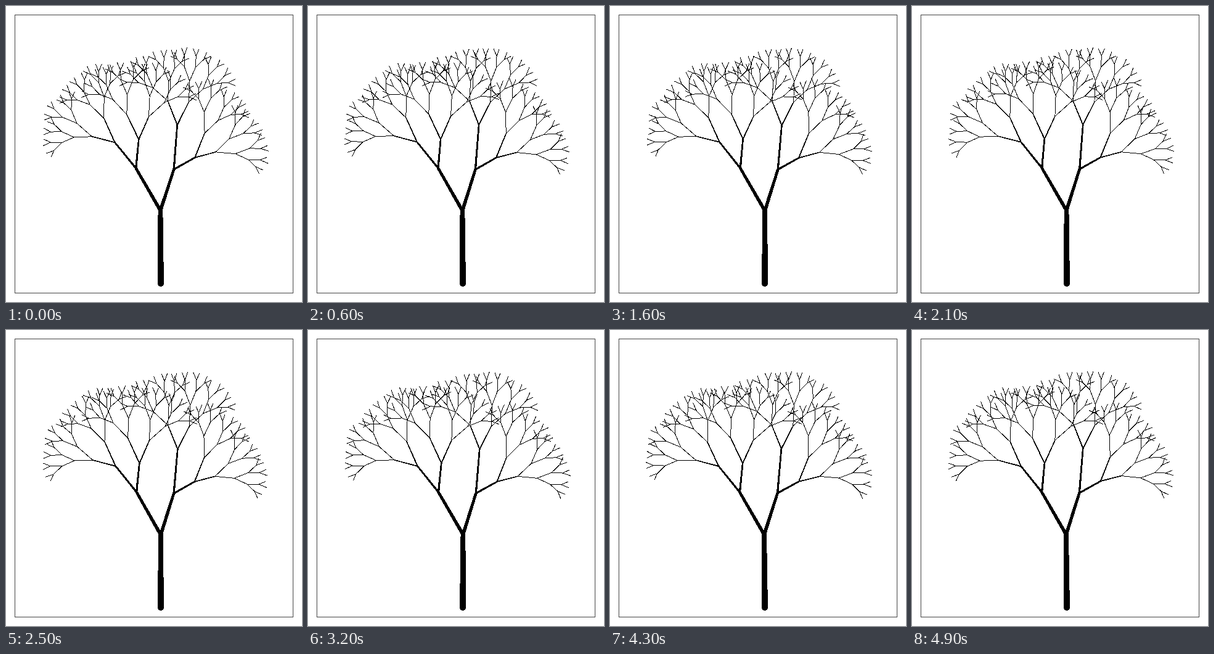
Animation, 480 px wide and 480 px high, one loop 5000 ms. Source, as an HTML page:

```html
<!DOCTYPE html>
<html lang="en">
<head>
<meta charset="utf-8">
<title>Trembling tree</title>
<style>
  html, body { margin: 0; width: 100%; height: 100%; overflow: hidden; background: #fff; }
  svg { display: block; width: 100vw; height: 100vh; }
</style>
</head>
<body>
<svg viewBox="0 0 480 480" shape-rendering="crispEdges">
  <rect width="480" height="480" fill="#fff"/>
  <rect x="14.5" y="14.5" width="451" height="451" fill="none" stroke="#444"/>
  <path id="wood"/>
  <path id="twigs" fill="none" stroke="#000"/>
</svg>
<script>
const STEP = 100, STEPS = 50, DEPTH = 7, THICK_LEVELS = 4;
const BASE = { x: 251, y: 450 };

// Ends of the trunk and the six main limbs; branch i forks into 2i and 2i + 1.
const limbs = [
  [250.7, 332],
  [211, 263], [272, 265],
  [177, 221], [215.5, 216], [278, 193], [306, 246]
];

// Repeatable noise from -1 to 1.
function noise(a, b) {
  const s = Math.sin(a * 127.1 + b * 311.7) * 43758.5453;
  return (s - Math.floor(s)) * 2 - 1;
}

// The heading depends on right turns minus left turns; side branches are shorter.
function grow(i, level, turn) {
  const spread = 22 + 80 / level ** 3;
  const angle = (turn * spread + noise(i, 3) * 3) * Math.PI / 180;
  const shrink = 1 - Math.abs(turn) * 5.7 / level ** 4;
  const length = 118 * 0.73 ** level * shrink * (1 + noise(i, 7) * 0.08);
  return [Math.sin(angle) * length, -Math.cos(angle) * length];
}

const branches = [{ ...BASE, turn: 0 }];
for (let i = 1; i < 2 ** (DEPTH + 1); i++) {
  const level = Math.floor(Math.log2(i));
  const parent = i >> 1;
  const from = branches[parent];
  const turn = level ? from.turn + (i % 2 ? 1 : -1) : 0;
  const end = limbs[i - 1];
  const [dx, dy] = end ? [end[0] - from.x, end[1] - from.y] : grow(i, level, turn);
  branches[i] = { level, parent, turn, dx, dy, x: from.x + dx, y: from.y + dy };
}

const pt = (x, y) => x.toFixed(2) + " " + y.toFixed(2);

function disc(p, r) {
  return `M${pt(p.x - r, p.y)}a${r} ${r} 0 1 0 ${2 * r} 0a${r} ${r} 0 1 0 ${-2 * r} 0z`;
}

// A tapered bar with round ends.
function limb(a, b, level) {
  const ra = 5 * 0.58 ** level, rb = ra * 0.78;
  const len = Math.hypot(b.x - a.x, b.y - a.y);
  const nx = (a.y - b.y) / len, ny = (b.x - a.x) / len;
  const side = (p, r) => pt(p.x + nx * r, p.y + ny * r);
  return `M${side(a, -ra)}L${side(a, ra)}L${side(b, rb)}L${side(b, -rb)}z` +
    disc(a, ra) + disc(b, rb);
}

const wood = document.getElementById("wood");
const twigs = document.getElementById("twigs");

// Every branch end trembles and carries its whole subtree along.
function draw(step) {
  const at = [BASE];
  let thick = "", thin = "";
  for (let i = 1; i < branches.length; i++) {
    const { level, parent, dx, dy } = branches[i];
    const from = at[parent];
    const to = at[i] = {
      x: from.x + dx + noise(i, step + 11) * (level ? 0.5 : 0.9),
      y: from.y + dy + noise(i, step + 83) * 0.4
    };
    if (level < THICK_LEVELS) thick += limb(from, to, level);
    else thin += `M${pt(from.x, from.y)}L${pt(to.x, to.y)}`;
  }
  wood.setAttribute("d", thick);
  twigs.setAttribute("d", thin);
}

const start = performance.now();
let shown = -1;
function tick() {
  const step = Math.floor((performance.now() - start) / STEP) % STEPS;
  if (step !== shown) draw(shown = step);
  requestAnimationFrame(tick);
}
tick();
</script>
</body>
</html>
```
